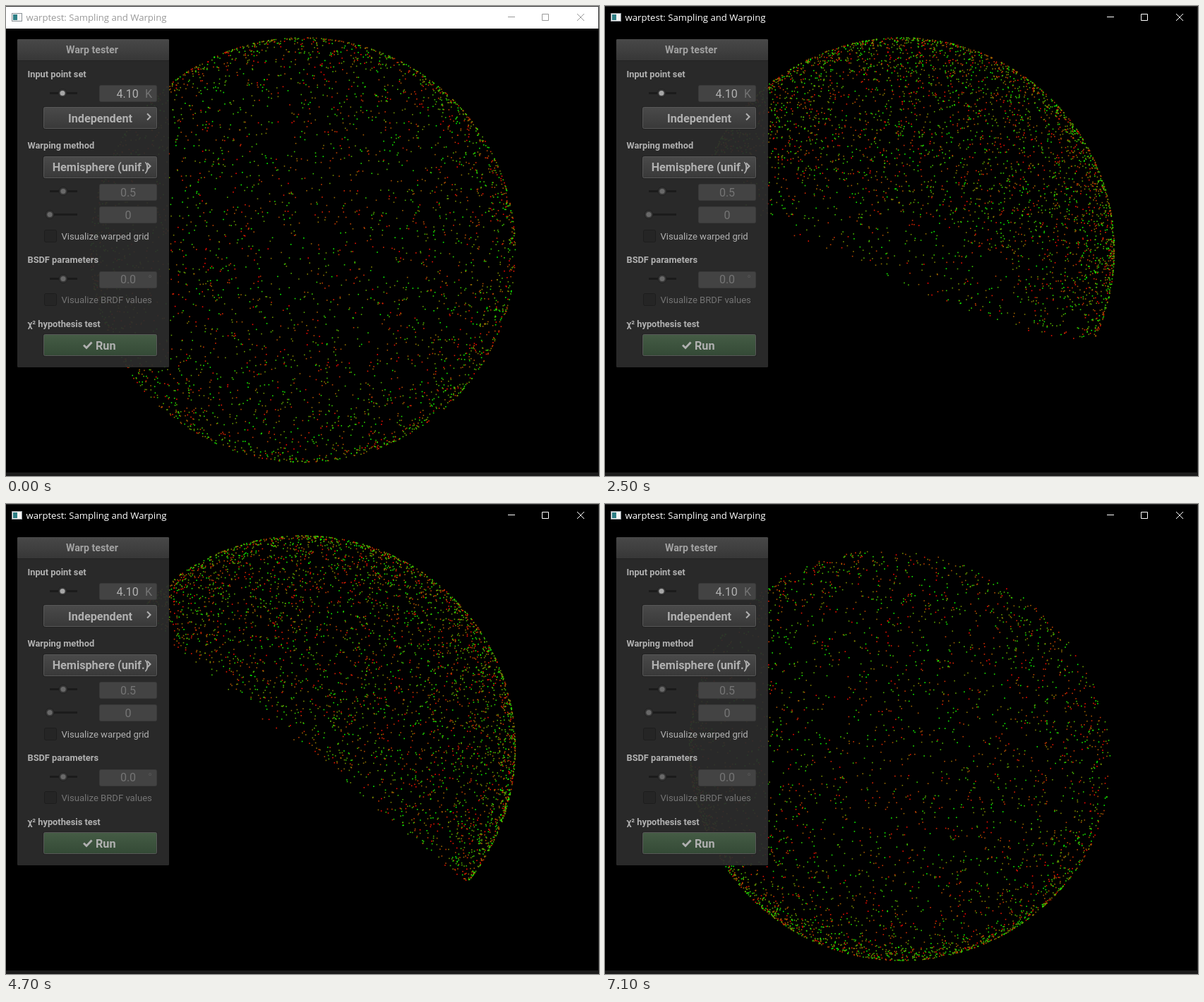
These frames come from a looping animation (840 by 666 pixels, 8000 ms). An HTML page with a canvas:

```html
<!DOCTYPE html>
<html lang="en">
<head>
<meta charset="utf-8">
<title>warptest</title>
<style>
html, body { margin: 0; width: 100%; height: 100%; overflow: hidden; background: #000; }
canvas, svg { position: absolute; left: 0; top: 0; width: 840px; height: 666px; }
text { font-family: Roboto, "Open Sans", sans-serif; fill: #b1b1b1; }
.caption { font: 13.15px "Open Sans", "Noto Sans", sans-serif; fill: #fff; }
.bar { fill: #000; }
.ctl { fill: none; stroke: #fff; }
.idle .bar { fill: #fff; }
.idle .caption { fill: #999; }
.idle .ctl { stroke: #999; }
.head { font-size: 14.2px; font-weight: 700; fill: #a2a2a2; }
.label { font-size: 12.8px; font-weight: 700; }
.btn { font-size: 16.2px; font-weight: 700; }
.val { font-size: 16px; }
.chk { font-size: 13.1px; }
.mid { text-anchor: middle; }
.dim { fill: #747474; }
.icon { fill: none; stroke: #b1b1b1; stroke-width: 2; }
</style>
</head>
<body>
<canvas id="dots" width="840" height="666"></canvas>
<svg id="ui" viewBox="0 0 840 666">
  <defs>
    <linearGradient id="gHead" x2="0" y2="1"><stop stop-color="#484848"/><stop offset="1" stop-color="#373737"/></linearGradient>
    <linearGradient id="gBtn" x2="0" y2="1"><stop stop-color="#4a4a4a"/><stop offset="1" stop-color="#393939"/></linearGradient>
    <linearGradient id="gRun" x2="0" y2="1"><stop stop-color="#455c45"/><stop offset="1" stop-color="#344a36"/></linearGradient>
  </defs>

  <rect class="bar" width="840" height="32"/>
  <path d="M0 .5H839.5V666" fill="none" stroke="#2c2c2c"/>
  <rect y="661" width="840" height="5" fill="#1c1c1c"/>
  <rect x="8.5" y="10.5" width="14" height="11" fill="#f4f4f4" stroke="#8d9499"/>
  <rect x="10" y="12" width="6" height="8" fill="#2f7f86"/>
  <text class="caption" x="28.5" y="21">warptest: Sampling and Warping</text>
  <path class="ctl" d="M711 15.5h10M759.5 11.5h9v9h-9zM809 11l10 10M819 11l-10 10"/>

  <rect x="16" y="47" width="215" height="465" rx="1.5" fill="#2d2d2d" fill-opacity=".92"/>
  <rect x="16" y="47" width="215" height="30" rx="1.5" fill="url(#gHead)"/>
  <path d="M16 77.5H231" stroke="#222"/>
  <text class="head mid" x="122" y="67">Warp tester</text>

  <g id="widgets"></g>
  <path class="icon" d="M200 152.5l4.5 4.5-4.5 4.5M200 222.5l4.5 4.5-4.5 4.5"/>
  <path class="icon" d="M110 480.5l4 4 7.5-8" style="stroke-width:2.8"/>

  <text class="label" x="30.5" y="101">Input point set</text>
  <text class="label" x="30.5" y="202">Warping method</text>
  <text class="label" x="30.5" y="364">BSDF parameters</text>
  <text class="label" x="30.5" y="455">χ² hypothesis test</text>
  <text class="btn mid" x="133.5" y="165">Independent</text>
  <text class="btn mid" x="134" y="234">Hemisphere (unif.)</text>
  <text class="btn" x="127" y="487">Run</text>
  <text class="val" x="156.5" y="130">4.10</text>
  <text class="val dim" x="197" y="130">K</text>
  <text class="val mid dim" x="173" y="270">0.5</text>
  <text class="val mid dim" x="173" y="302">0</text>
  <text class="val mid dim" x="173" y="393">0.0</text>
  <text class="val" x="201" y="393" style="fill:#555">°</text>
  <text class="chk" x="78.5" y="330.5">Visualize warped grid</text>
  <text class="chk dim" x="78.5" y="421">Visualize BRDF values</text>
</svg>
<script>
const LOOP = 8000, STEP = 100, COUNT = 4096;
const CX = 420.5, CY = 346, R = 301, DOT = 1.6;
const ui = document.getElementById('ui');
const ctx = document.getElementById('dots').getContext('2d');

const box = (x, y, w, h, fill, line) =>
  `<rect x="${x}" y="${y}" width="${w}" height="${h}" rx="2" fill="${fill}" stroke="${line}"/>`;

const button = (y, fill) =>
  box(52.5, y - 1, 162, 32, 'none', '#222') + box(53.5, y, 160, 30, fill, '#575757');

const slider = (y, knob, lit) =>
  `<path d="M62 ${y}H101" stroke="#1b1b1b" stroke-width="3"/>
   <circle cx="${knob}" cy="${y}" r="6" fill="#373737" stroke="#202020"/>
   <circle cx="${knob}" cy="${y}" r="3.6" fill="${lit ? '#a6a6a6' : '#696969'}"/>`;

document.getElementById('widgets').innerHTML =
  slider(123.5, 80, true) + slider(262.5, 81) + slider(295.5, 62) + slider(386.5, 81) +
  [112.5, 252.5, 284.5, 376.5].map(y => box(132.5, y, 81, 23, '#434343', '#3a3a3a')).join('') +
  [317.5, 407.5].map(y => box(54.5, y, 17, 17, '#252525', '#1d1d1d')).join('') +
  button(143.5, 'url(#gBtn)') + button(213.5, 'url(#gBtn)') + button(465.5, 'url(#gRun)');

// Seeded generator
let seed = 20;
function rand() {
  seed = (seed + 0x6D2B79F5) | 0;
  let v = Math.imul(seed ^ (seed >>> 15), 1 | seed);
  v = (v + Math.imul(v ^ (v >>> 7), 61 | v)) ^ v;
  return ((v ^ (v >>> 14)) >>> 0) / 4294967296;
}

// Uniform samples on the hemisphere, tinted from red to green by index
const points = Array.from({ length: COUNT }, (_, i) => {
  const z = rand(), a = rand() * 2 * Math.PI, r = Math.sqrt(1 - z * z), m = i / COUNT;
  return {
    x: r * Math.cos(a), y: r * Math.sin(a), z,
    color: `rgb(${Math.round(255 * (1 - m))},${Math.round(255 * m)},0)`
  };
});

// Direction of the dome's pole: time, x, y (up)
const poses = [
  [700, .03, .04], [1600, .239, .2], [2500, .392, .906], [3300, .082, .85],
  [3400, .08, .806], [3800, .267, .662], [4300, .497, .709], [4700, .633, .774],
  [5300, .477, .826], [5500, .477, .826], [6000, .635, .367], [6400, .2, -.05],
  [7100, -.195, -.366]
];

function poleAt(t) {
  const last = poses[poses.length - 1];
  if (t <= poses[0][0]) return poses[0].slice(1);
  if (t >= last[0]) return last.slice(1);
  const i = poses.findIndex(p => p[0] > t);
  const a = poses[i - 1], b = poses[i], u = (t - a[0]) / (b[0] - a[0]);
  return [a[1] + (b[1] - a[1]) * u, a[2] + (b[2] - a[2]) * u];
}

function draw(t) {
  const [nx, ny] = poleAt(t);
  const nz = Math.sqrt(Math.max(0, 1 - nx * nx - ny * ny));
  const k = 1 / (1 + nz), xx = 1 - nx * nx * k, xy = -nx * ny * k, yy = 1 - ny * ny * k;
  ctx.clearRect(0, 0, 840, 666);
  for (const p of points) {
    const x = p.x * xx + p.y * xy + p.z * nx;
    const y = p.x * xy + p.y * yy + p.z * ny;
    ctx.fillStyle = p.color;
    ctx.fillRect(CX + R * x - DOT / 2, CY - R * y - DOT / 2, DOT, DOT);
  }
  ui.classList.toggle('idle', t < 800);
}

let shown = -1;
function tick() {
  const t = Math.floor(performance.now() % LOOP / STEP) * STEP;
  if (t !== shown) draw(shown = t);
  requestAnimationFrame(tick);
}
tick();
</script>
</body>
</html>
```
